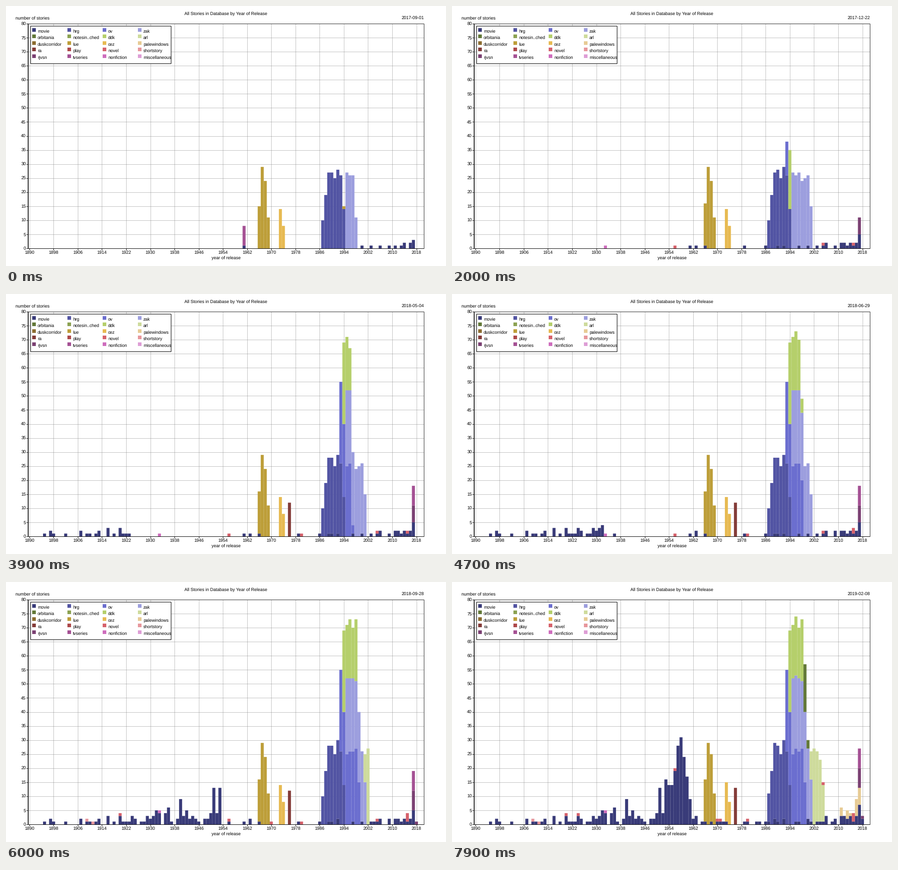
Recreate the animation shown at these times as a matplotlib script. Size 974 px wide and 575 px high, loop 8000 ms.

```python
import numpy as np
import matplotlib
import matplotlib.pyplot as plt
from matplotlib.animation import FuncAnimation
from matplotlib.collections import PolyCollection
from matplotlib.patches import Rectangle

W, H, DPI = 974, 575, 100
PX = 72 / DPI
LEFT, RIGHT, TOP, BASE = 48.5, 925.3, 39, 536
FIRST, YEARS = 1890, 131
STEP = (RIGHT - LEFT) / YEARS
UNIT = (BASE - TOP) / 80
FRAMES, HOLD = 80, 4
START = np.datetime64("2017-09-01")

matplotlib.rcParams.update({
    "font.family": "Liberation Sans",
    "font.size": 9.75 * PX,
    "text.hinting": "none",
})

# Stacking order, bottom to top; also the legend order, row by row.
SERIES = ["movie", "hrg", "ov", "zak",
          "orbitania", "notesin..ched", "ddk", "arl",
          "duskcorridor", "lue", "cez", "palewindows",
          "ra", "play", "novel", "shortstory",
          "rjvsn", "tvseries", "nonfiction", "miscellaneous"]
COLORS = plt.get_cmap("tab20b").colors


def run(start, *counts):
    """Counts for consecutive years."""
    return {start + i: c for i, c in enumerate(counts) if c}


def ones(*years):
    return {y: 1 for y in years}


# (series, first week, last week, stories added per year)
BATCHES = [
    ("movie", -1, 0, ones(1961, 2000, 2003, 2006, 2009, 2011, 2013)
     | {2014: 2, 2016: 2, 2017: 3}),
    ("tvseries", -1, 0, {1961: 7}),
    ("lue", -1, 0, run(1966, 15, 29, 24, 11) | {1994: 1}),
    ("cez", -1, 0, run(1973, 14, 8)),
    ("hrg", -1, 0, run(1987, 10, 19, 27, 27, 25, 28, 26, 14)),
    ("zak", -1, 0, run(1995, 27, 26, 26, 11)),

    ("tvseries", 0, 1, {1961: -7}),
    ("lue", 0, 2, {1994: -1}),
    ("zak", 0, 13.6, run(1998, 13, 25, 25, 15)),
    ("ov", 13.6, 16, {1993: 12}),
    ("ddk", 10, 16, {1994: 21}),
    ("rjvsn", 2, 14, {2017: 6}),
    ("nonfiction", 4, 8, ones(1933)),
    ("novel", 2, 14, ones(1956, 2005, 2015)),
    ("movie", 0, 16, ones(1963, 1966, 1979, 1986, 1990, 1992, 1997,
                          2005, 2006, 2011, 2015) | {2012: 2, 2017: 2}),

    ("movie", 18, 24, ones(1989)),
    ("ov", 16, 27, run(1993, 17, 26, 12)),
    ("ddk", 16, 27, run(1994, 8, 6)),
    ("ra", 18, 27, {1976: 12}),
    ("novel", 18, 26, ones(1980)),
    ("tvseries", 18, 27, {2017: 7}),

    ("ov", 27, 43, run(1995, 13, 26, 25, 20)),
    ("ddk", 27, 43, run(1995, 13, 21, 18, 5)),
    ("novel", 30, 40, ones(2015)),
    ("movie", 27, 43,
     run(1895, 1, 0, 2, 1, 0, 0, 0, 1) | run(1907, 2, 0, 1, 1, 0, 1, 2)
     | run(1916, 3, 0, 1, 0, 3, 1, 1, 1, 3, 2)
     | run(1927, 1, 1, 3, 2, 3, 4) | ones(1936, 1963, 2009)),

    ("ov", 43, 48, run(1998, 7, 15)),
    ("ddk", 43, 48, {1998: 17}),
    ("arl", 48, 56, run(2001, 10, 27)),
    ("shortstory", 44, 54, ones(1909, 1911)),
    ("novel", 44, 56, ones(1920, 1970, 2015)),
    ("rjvsn", 46, 54, ones(2017, 2018)),
    ("movie", 43, 56,
     run(1932, 1, 4, 0, 4, 5, 1, 0, 2, 9, 3, 5, 2, 3, 2, 1)
     | run(1948, 2, 2, 4, 13, 4, 13) | ones(1956, 1992, 2004)),

    ("arl", 56, 65, run(2003, 25, 21)),
    ("novel", 58, 64, ones(1971)),
    ("movie", 56, 65, run(1953, 3, 14, 14, 18, 24, 5, 1)
     | {1968: 1, 1970: 1, 2018: 2}),

    ("arl", 65, 68, run(2004, 1, 13)),
    ("palewindows", 68, 72, run(2011, 3, 0, 3, 1, 0, 6, 6)),
    ("orbitania", 71, 75, run(1999, 17, 3)),
    ("novel", 68, 73, ones(1924)),
    ("ra", 67, 72, ones(1976)),
    ("movie", 65, 75,
     run(1957, 4, 26, 23, 17, 8, 2, 1, 0, 1)
     | ones(1971, 1972, 1973, 1980, 1983, 1984, 1987, 1989, 1996)
     | ones(2000, 2001, 2006, 2008, 2011, 2012, 2013, 2014, 2016)
     | {2017: 2}),
]


def tally(week):
    """Stories per series and year; each batch fills up in year order."""
    table = np.zeros((len(SERIES), YEARS))
    for name, w0, w1, added in BATCHES:
        part = min(max((week - w0) / (w1 - w0), 0), 1)
        left = round(part * sum(abs(c) for c in added.values()))
        row = table[SERIES.index(name)]
        for year, c in sorted(added.items()):
            n = min(left, abs(c))
            row[year - FIRST] += n if c > 0 else -n
            left -= n
    return table


def xpos(year):
    return LEFT + (year - FIRST + 0.5) * STEP


def ypos(count):
    return BASE - count * UNIT


fig = plt.figure(figsize=(W / DPI, H / DPI), dpi=DPI, facecolor="white")
ax = fig.add_axes([0, 0, 1, 1])
ax.set_xlim(0, W)
ax.set_ylim(H, 0)
ax.axis("off")


def line(x, y, width=1.0, **kw):
    ax.plot(x, y, lw=width * PX, solid_capstyle="butt", **kw)


def text(x, y, s, ha="left"):
    return ax.text(x, y, s, ha=ha, va="baseline", color="black", zorder=6)


def grid(x, y):
    line(x, y, color="#808080", ls=(0, (1, 1)), dash_capstyle="butt", zorder=1)


for year in range(1890, 2019, 8):
    x = xpos(year)
    grid([x, x], [BASE, TOP])
    line([x, x], [BASE, BASE + 3.5], color="black", zorder=3)
    text(x, 549, str(year), "center")
for n in range(0, 81, 5):
    y = ypos(n)
    grid([LEFT, RIGHT], [y, y])
    line([LEFT - 3.5, LEFT], [y, y], color="black", zorder=3)
    text(44, y + 3.5, str(n), "right")

ax.add_patch(Rectangle((LEFT, TOP), RIGHT - LEFT, BASE - TOP, fill=False,
                       ec="#222222", lw=PX, zorder=3))
line([LEFT, LEFT], [TOP, BASE], 1.5, color="black", zorder=3)
line([LEFT, RIGHT], [BASE, BASE], color="black", zorder=3)

text(487, 19.7, "All Stories in Database by Year of Release", "center")
text(21, 29.5, "number of stories")
text(487, 560.3, "year of release", "center")
date = text(925, 29.5, "", "right")

ax.add_patch(Rectangle((53.5, 43.5), 311.7, 83, fc="white", ec="#222222",
                       lw=1.3 * PX, zorder=4))
for i, name in enumerate(SERIES):
    x, y = 58 + 78 * (i % 4), 48.5 + 14.6 * (i // 4)
    ax.add_patch(Rectangle((x, y), 8, 8, fc=COLORS[i], ec="none", zorder=5))
    text(x + 12, y + 10, name)

bars = PolyCollection([], edgecolors="none", linewidths=0, zorder=2)
bars.set_snap(False)
ax.add_collection(bars, autolim=False)


def draw(frame):
    week = max(0, frame - HOLD)
    table = tally(week)
    tops = table.cumsum(axis=0)
    verts, fills = [], []
    for s, k in zip(*np.nonzero(table)):
        x0, x1 = LEFT + k * STEP, LEFT + (k + 1) * STEP
        y1 = ypos(tops[s, k])
        y0 = y1 + table[s, k] * UNIT
        verts.append([(x0, y0), (x0, y1), (x1, y1), (x1, y0)])
        fills.append(COLORS[s])
    bars.set_verts(verts)
    bars.set_facecolor(fills)
    date.set_text(str(START + np.timedelta64(7 * week, "D")))
    return bars, date


anim = FuncAnimation(fig, draw, frames=FRAMES, interval=100,
                     repeat=True, repeat_delay=0, blit=False)
plt.show()
```
